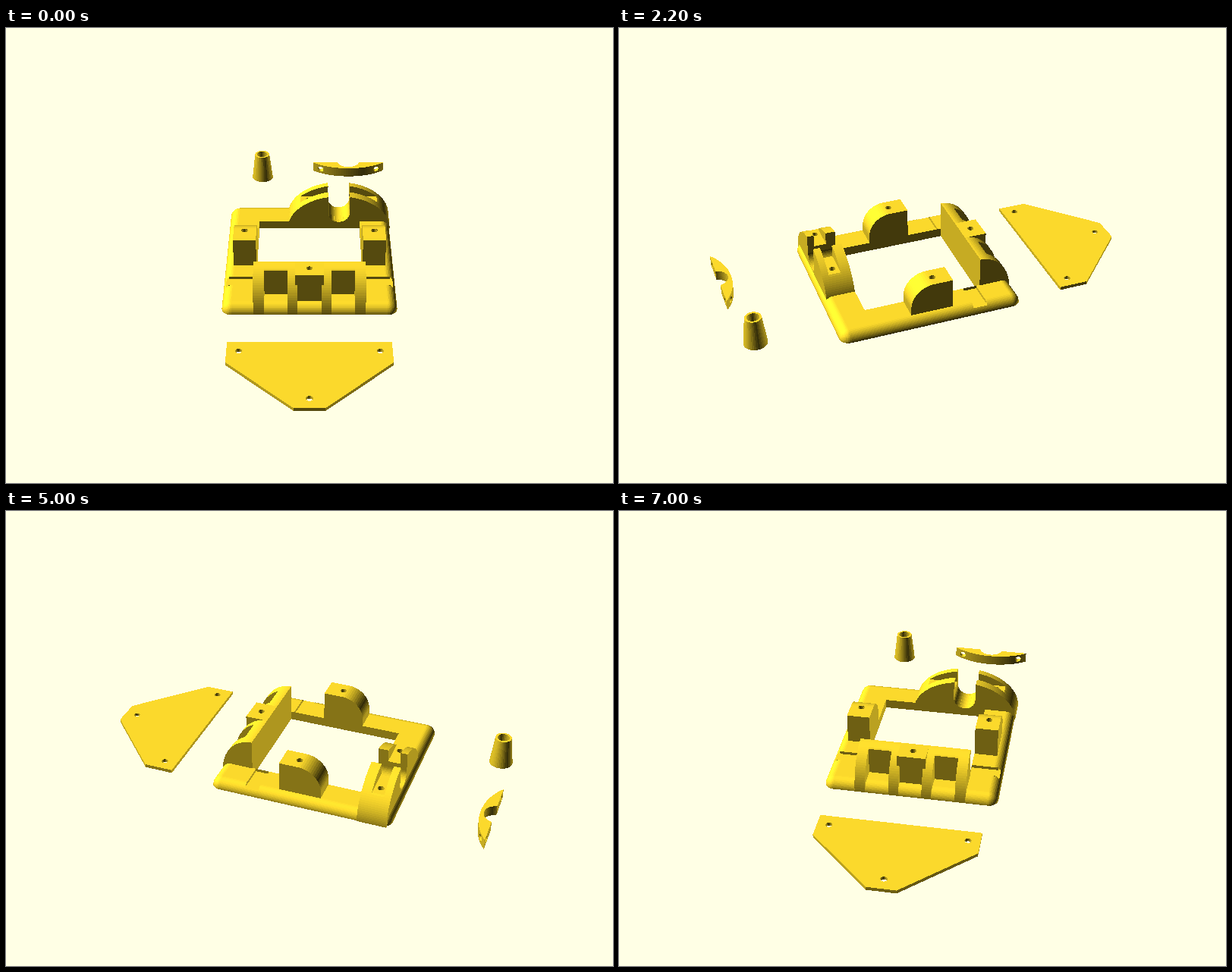
Animation of 800x600 px, one loop 7200 ms. Source, as an HTML page with a canvas:

```html
<!DOCTYPE html>
<html>
<head>
<meta charset="utf-8">
<style>
html, body { margin: 0; width: 100%; height: 100%; overflow: hidden; background: #ffffe5; }
canvas { display: block; }
</style>
</head>
<body>
<canvas id="stage" width="800" height="600"></canvas>
<script>
const W = 800, H = 600, FOCUS = 1508, TAU = Math.PI * 2;
const TILT = 35 * Math.PI / 180, S = Math.sin(TILT), C = Math.cos(TILT);
const BED = -25.5, DECK = -13, TOP = 27.5, HOLE = 4.2;
const RIM = DECK - BED, DOME = TOP - BED;
const faces = [];   // each face is a list of loops, filled even-odd

// ---- modelling helpers ----
const arc = (cx, cy, rx, from, to, n = 24, ry = rx) => Array.from({ length: n + 1 }, (_, i) => {
  const a = from + (to - from) * i / n;
  return [cx + rx * Math.cos(a), cy + ry * Math.sin(a)];
});
const circle = (cx, cy, r, n = 24) => arc(cx, cy, r, 0, TAU, n);
const rect = (x0, y0, x1, y1) => [[x0, y0], [x1, y0], [x1, y1], [x0, y1]];
const place = {
  x: h => ([a, b]) => [h, a, b],
  y: h => ([a, b]) => [a, h, b],
  z: h => ([a, b]) => [a, b, h]
};
const lift = (loop, axis, h) => loop.map(place[axis](h));

function skin(a, b) {
  a.forEach((p, i) => {
    const j = (i + 1) % a.length;
    faces.push([[p, a[j], b[j], b[i]]]);
  });
}
function prism(axis, loop, lo, hi) {
  const a = lift(loop, axis, lo), b = lift(loop, axis, hi);
  faces.push([a], [b]);
  skin(a, b);
}

// ---- screw holes: x, y, bottom, top ----
const holes = [
  [-85.5, -171, BED, -21], [85.5, -171, BED, -21], [0, -255.5, BED, -21],
  [-85.5, 18.2, DECK, TOP - 0.3], [85.5, 18.2, DECK, TOP - 0.3], [0, -67.4, DECK, TOP],
  [-1, 123.5, BED, 9.5], [83, 123.5, BED, 9.5]
];
for (const [x, y, lo, hi] of holes) {
  const c = circle(x, y, HOLE + 0.05);
  skin(lift(c, 'z', lo), lift(c, 'z', hi));
}

const inside = (dx, dy, r) => dx * dx + dy * dy < r * r;

// True where material has been drilled or milled away
function removed(x, y, z) {
  if (y > 230) return inside(Math.abs(x - 58.4) - 41.5, z + 18.5, HOLE);
  if (y > 100 && inside(x - 41, z - 0.5, 14.9)) return true;
  if (y > -47.99 && y < -29.51 && z > -16.99 && z < 0 && Math.abs(x) > 70.01) return true;
  return holes.some(h => inside(x - h[0], y - h[1], HOLE));
}

// ---- cover plate ----
prism('z', [[-100.5, -154], [100.5, -154], [100.5, -192], [18, -272], [-18, -272], [-100.5, -192]], BED, -21);

// ---- cone ----
const coneRing = (r, z) => lift(circle(-70.2, 243, r, 36), 'z', z);
skin(coneRing(15.2, BED), coneRing(10.6, 13.5));
skin(coneRing(7.8, BED), coneRing(7.8, 13.5));
faces.push([coneRing(10.6, 13.5), coneRing(7.8, 13.5)]);

// ---- clamp ----
const capCurve = x => 297.3 - DOME * Math.sqrt(1 - ((x - 58.4) / 71.5) ** 2);
prism('z', [
  ...arc(58.4, 297.3, 71.5, -Math.PI / 2 - 0.829, -Math.PI / 2 + 0.829, 32, DOME),
  ...arc(58.4, 265, 16.5, -0.21, -Math.PI + 0.21, 20)
], BED, -11.5);
for (const x of [16.9, 99.9]) {
  const c = circle(x, -18.5, HOLE + 0.05);
  skin(lift(c, 'y', 261.5), c.map(([px, pz]) => [px, capCurve(px), pz]));
}

// ---- frame with rounded rim ----
const rim = step => {
  const a = step / 12 * Math.PI / 2, r = RIM * Math.cos(a);
  const corners = [[99, 132.5], [-99, 132.5], [-99, -82], [99, -82]];
  const loop = corners.flatMap(([x, y], i) => arc(x, y, r, i * TAU / 4, (i + 1) * TAU / 4, 8));
  return lift(loop, 'z', BED + RIM * Math.sin(a));
};
const opening = rect(-70, -52.5, 70, 102.5);
for (let i = 0; i < 12; i++) skin(rim(i), rim(i + 1));
faces.push([rim(0), lift(opening, 'z', BED)], [rim(12), lift(opening, 'z', DECK)]);
skin(lift(opening, 'z', BED), lift(opening, 'z', DECK));

for (const side of [-1, 1]) {
  const x0 = side * 70;
  faces.push([lift(rect(x0, -48, side * 108, -29.5), 'z', -17)]);
  for (const y of [-48, -29.5]) faces.push([lift(rect(x0, -17, side * 105, DECK), 'y', y)]);
  // rounded side mount
  prism('x', [[-4, DECK], [-4, TOP], ...arc(21, TOP - 30, 30, Math.PI / 2, 0, 16), [51, DECK]], x0, side * 100);
}

// ---- front wall, ribs and centre mount ----
const rib = [[-52.5, BED], ...arc(-52.5, BED, 42, Math.PI / 2, Math.PI, 24, DOME)];
prism('x', rib.map(([y, z]) => [Math.max(y, -67.5), z]), -71, 71);
for (const [a, b] of [[-71, -57.5], [-27.5, -15], [15, 27.5], [57.5, 71]]) prism('x', rib, a, b);
prism('z', rect(-18, -82, 18, -52.5), DECK, TOP);

// ---- slotted arch ----
const arch = [
  ...arc(41, BED, 71.5, Math.PI, Math.PI / 2 + 0.211, 28, DOME),
  ...arc(41, 0.5, 15, Math.PI, TAU, 20),
  ...arc(41, BED, 71.5, Math.PI / 2 - 0.211, 0, 28, DOME)
];
prism('y', arch, 102.5, 115.5);
prism('y', arch.map(([x, z]) => [x, Math.min(z, 9.5)]), 115.5, 131.5);
prism('y', arch, 131.5, 140.5);

// ---- depth-buffered renderer ----
const ctx = document.getElementById('stage').getContext('2d');
const image = ctx.createImageData(W, H);
const pixels = new Uint32Array(image.data.buffer);
const nearest = new Float32Array(W * H);   // inverse depth

function shade(n) {
  const light = 0.2 + Math.abs(n[1] - n[0] - n[2]) / Math.sqrt(3);
  const [r, g, b] = [250, 216, 44].map(v => Math.min(255, Math.round(v * light)));
  return (255 << 24 | b << 16 | g << 8 | r) >>> 0;
}

function normalOf(loop) {
  const n = [0, 0, 0];
  loop.forEach((p, i) => {
    const q = loop[(i + 1) % loop.length];
    for (let k = 0; k < 3; k++) {
      const a = (k + 1) % 3, b = (k + 2) % 3;
      n[k] += (p[a] - q[a]) * (p[b] + q[b]);
    }
  });
  const len = Math.hypot(...n);
  return len < 1e-6 ? null : n.map(v => v / len);
}

function fillFace(loops, cos, sin) {
  const n = normalOf(loops[0]);
  if (!n) return;
  const p = loops[0][0], dist = n[0] * p[0] + n[1] * p[1] + n[2] * p[2];
  if (Math.abs(dist) < 1e-6) return;
  const color = shade(n), edges = [];
  let top = H, bottom = 0;
  for (const loop of loops) {
    const pts = loop.map(([x, v, d]) => [W / 2 + x * FOCUS / d, H / 2 - v * FOCUS / d]);
    pts.forEach((a, i) => {
      edges.push([a, pts[(i + 1) % pts.length]]);
      top = Math.min(top, a[1]);
      bottom = Math.max(bottom, a[1]);
    });
  }
  for (let row = Math.max(0, Math.ceil(top - 0.5)); row < Math.min(H, bottom); row++) {
    const y = row + 0.5, cuts = [];
    for (const [a, b] of edges) {
      if (a[1] <= y !== b[1] <= y) cuts.push(a[0] + (b[0] - a[0]) * (y - a[1]) / (b[1] - a[1]));
    }
    cuts.sort((a, b) => a - b);
    const kv = (H / 2 - y) / FOCUS;
    for (let c = 0; c + 1 < cuts.length; c += 2) {
      const end = Math.min(W, Math.ceil(cuts[c + 1] - 0.5));
      for (let col = Math.max(0, Math.ceil(cuts[c] - 0.5)); col < end; col++) {
        const kx = (col + 0.5 - W / 2) / FOCUS;
        const inv = (n[0] * kx + n[1] * kv + n[2]) / dist;
        const at = row * W + col;
        if (inv <= nearest[at]) continue;
        const depth = 1 / inv, x = kx * depth, v = kv * depth, d = depth - FOCUS;
        const yr = v * S + d * C;
        if (removed(x * cos + yr * sin, yr * cos - x * sin, v * C - d * S)) continue;
        nearest[at] = inv;
        pixels[at] = color;
      }
    }
  }
}

function render(angle) {
  const cos = Math.cos(angle), sin = Math.sin(angle);
  const toCamera = ([x, y, z]) => {
    const yr = x * sin + y * cos;
    return [x * cos - y * sin, yr * S + z * C, FOCUS + yr * C - z * S];
  };
  pixels.fill(0xffe5ffff);
  nearest.fill(0);
  for (const face of faces) fillFace(face.map(loop => loop.map(toCamera)), cos, sin);
  ctx.putImageData(image, 0, 0);
}

// The turntable advances ten degrees every 200 ms
let shown = -1;
function tick() {
  const step = Math.floor(performance.now() / 200) % 36;
  if (step !== shown) {
    shown = step;
    render(step * TAU / 36);
  }
  requestAnimationFrame(tick);
}
tick();
</script>
</body>
</html>
```
